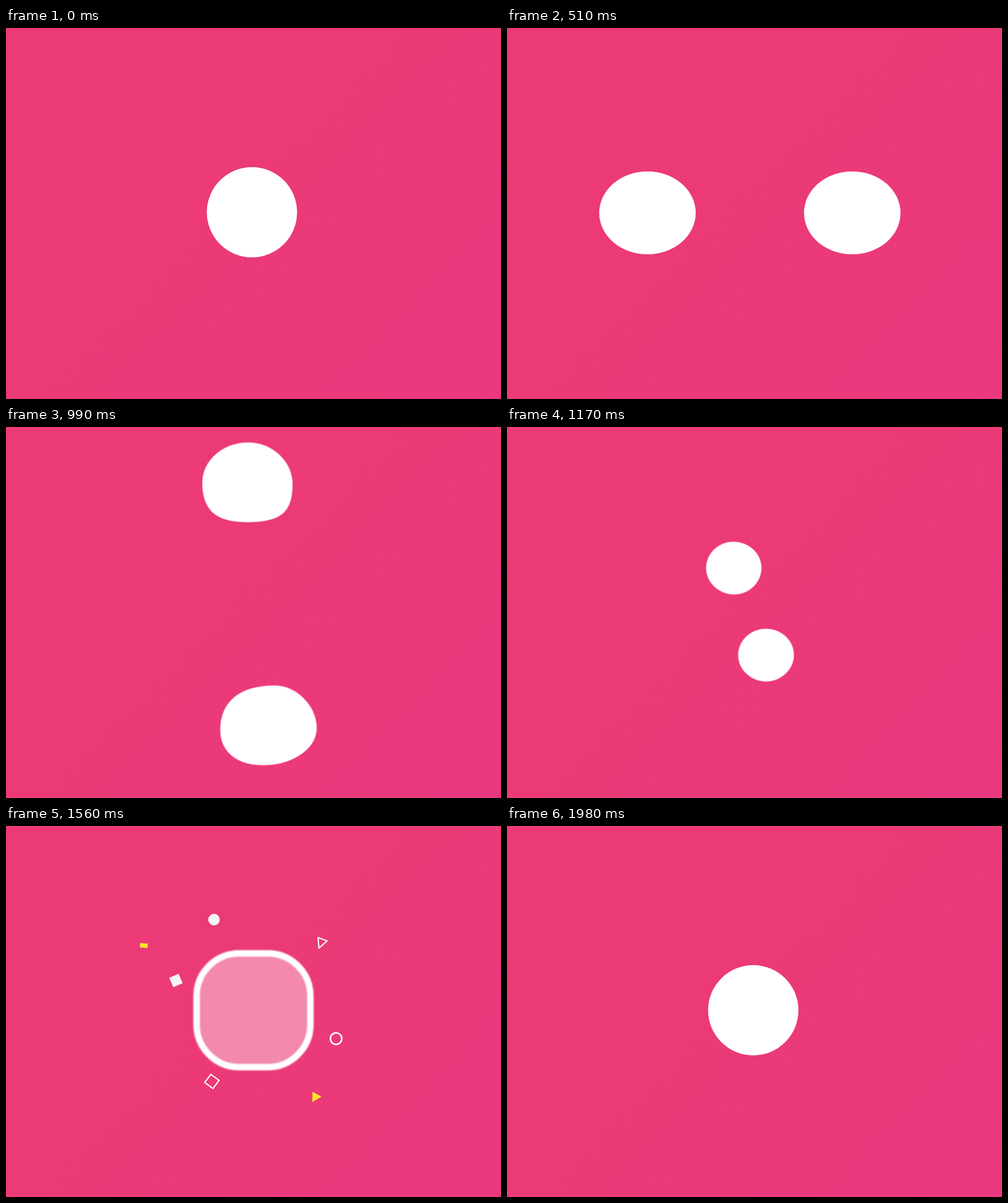
An HTML page that plays this animation: 800 px wide and 600 px high, repeating every 2.13 s.

```html
<!DOCTYPE html>
<html lang="en">
<head>
<meta charset="utf-8">
<title>Bouncing dot loop</title>
<style>
  html, body { margin: 0; width: 100%; height: 100%; overflow: hidden; background: #eb3a77; }
  svg {
    display: block; width: 100vw; height: 100vh;
    background: linear-gradient(135deg, #eb3a75 0%, #eb3a77 45%, #ea387f 100%);
  }
</style>
</head>
<body>
<svg id="stage" viewBox="0 0 800 600"></svg>
<script>
const LOOP = 2130, STEP = 30;
const ROUND = 0.5523;
const stage = document.getElementById('stage');

const clamp = x => Math.min(1, Math.max(0, x));
const ramp = (t, from, to) => clamp((t - from) / (to - from));
const n = x => +x.toFixed(2);

// Smooth curve through rows of [time, ...values], at rest at both ends.
function track(rows) {
  const last = rows.length - 1;
  const slope = (i, k) => i === 0 || i === last ? 0 :
    (rows[i + 1][k] - rows[i - 1][k]) / (rows[i + 1][0] - rows[i - 1][0]);
  return time => {
    const t = Math.min(rows[last][0], Math.max(rows[0][0], time));
    let i = 0;
    while (i < last - 1 && t >= rows[i + 1][0]) i++;
    const a = rows[i], b = rows[i + 1], d = b[0] - a[0];
    const u = (t - a[0]) / d, v = 1 - u;
    return a.slice(1).map((_, j) => {
      const k = j + 1;
      return v * v * (1 + 2 * u) * a[k] + u * u * (3 - 2 * u) * b[k]
        + d * u * v * (v * slope(i, k) - u * slope(i + 1, k));
    });
  };
}

// time, centre x, centre y, half distance, rx, ry
const split = track([
  [150, 397.5, 298, 0, 72.8, 72.8],
  [300, 395.5, 298, 42, 76, 70],
  [400, 393.5, 298.5, 100, 79, 66],
  [510, 392.5, 299, 165.5, 78, 67],
  [600, 392.5, 299, 206, 73, 75.5],
  [660, 392, 298, 199, 72.5, 72.5]
]);

// time, angle, distance, width, height,
// offsets of the left, top, right and bottom extremes, roundness of each corner
const plain = (t, angle, distance, w, h) =>
  [t, angle, distance, w, h, 0, 0, 0, 0, ROUND, ROUND, ROUND, ROUND];
const leader = track([
  plain(660, 180, 199, 145, 145),
  [780, 183.5, 211.4, 119, 161.5, 1, 12, -13, 14, .55, .72, .72, .55],
  [990, 269.5, 208.5, 145, 128, .5, 1, 3.5, 0, .55, .55, .74, .7],
  plain(1110, 380, 150, 126, 116),
  plain(1230, 480, 0, 44, 44),
  plain(1290, 510, 0, 0, 0)
]);
const follower = track([
  plain(660, 0, 199, 145, 145),
  [780, 1.9, 192.6, 136, 150, -4, -3, -1, -3, .55, .55, .55, .55],
  [990, 80.1, 187.3, 155, 128, 7.5, 10, 4.5, -8, .64, .52, .55, .62],
  plain(1110, 190, 150, 126, 116),
  plain(1230, 300, 0, 44, 44),
  plain(1290, 330, 0, 0, 0)
]);

// time, half size, corner (1 is a circle), turn, line, blur, fill, centre x
const badge = track([
  [1260, 0, 1, 0, 4, 6, 0, 400.5],
  [1380, 101, 1, 0, 2, 20, 0, 400.5],
  [1470, 126, 1, 0, 4, 7, 0, 400.5],
  [1560, 92, .75, 0, 7, 6, .4, 400],
  [1620, 74, .5, 7, 9, 5, .8, 399.5],
  [1680, 73, .48, 24, 9, 5, .965, 399],
  [1800, 73, .7, 66, 3, 2, 1, 398.5],
  [1980, 73, 1, 90, 0, 0, 1, 398]
]);

const line = 'fill="none" stroke="#fff" stroke-width="2"';
const box = (w, h, style) => `<rect x="${-w / 2}" y="${-h / 2}" width="${w}" height="${h}" ${style}/>`;
const confetti = [
  { x: 319, y: 112, turn: 0, art: '<circle r="9.3" fill="#f5f5f5"/>' },
  { x: 175, y: 165, turn: 30, fade: [1680, 1780], art: box(12.5, 7, 'fill="#fbe726"') },
  { x: 241, y: 237, turn: 2, art: box(16.5, 16.5, 'fill="#f5f5f5"') },
  { x: 539, y: 157, turn: 0, art: `<path d="M-2-8L9 3L-8 8Z" ${line} stroke-linejoin="round"/>` },
  { x: 569.3, y: 356.2, turn: 0, art: `<circle r="9.3" ${line} style="stroke-width:2.6"/>` },
  { x: 314.7, y: 444, turn: -28, art: box(16.5, 16.5, line) },
  { x: 526, y: 474, turn: 0, art: '<path d="M-.5-8L9 5.5L-8 7Z" fill="#fbe726"/>' }
];

const ellipse = (x, y, rx, ry) =>
  `<ellipse cx="${n(x)}" cy="${n(y)}" rx="${n(rx)}" ry="${n(ry)}" fill="#fff"/>`;

function drawSplit(t) {
  const [x, y, gap, rx, ry] = split(t);
  let art = ellipse(x - gap, y, rx, ry) + ellipse(x + gap, y, rx, ry);
  const thin = (gap - 51) / 54;
  if (thin > 0 && thin < 1) {
    const h = .7 * ry, c = 2 * h * (1 - thin) - h, reach = gap - .7 * rx;
    art += `<path fill="#fff" d="M${n(x - reach)} ${n(y - h)}Q${n(x)} ${n(y - c)} ${n(x + reach)} ${n(y - h)}`
      + `V${n(y + h)}Q${n(x)} ${n(y + c)} ${n(x - reach)} ${n(y + h)}Z"/>`;
  }
  return art;
}

function drawBlob([angle, distance, w, h, ly, tx, ry, bx, ...corners]) {
  if (w < 1 || h < 1) return '';
  const a = angle * Math.PI / 180;
  const x = 392 + distance * Math.cos(a) + (1 - clamp(distance / 150)) * 8;
  const y = 298 + distance * Math.sin(a);
  const ends = [[-w / 2, ly], [tx, -h / 2], [w / 2, ry], [bx, h / 2]];
  let d = `M${n(ends[0][0])} ${n(ends[0][1])}`;
  corners.forEach((k, i) => {
    const p = ends[i], q = ends[(i + 1) % 4];
    const dx = (q[0] - p[0]) * k, dy = (q[1] - p[1]) * k;
    const upright = i % 2 === 0;
    const c1 = upright ? [p[0], p[1] + dy] : [p[0] + dx, p[1]];
    const c2 = upright ? [q[0] - dx, q[1]] : [q[0], q[1] - dy];
    d += 'C' + [...c1, ...c2, ...q].map(n).join(' ');
  });
  return `<path transform="translate(${n(x)} ${n(y)})" d="${d}Z" fill="#fff"
    stroke="#fff" stroke-opacity=".45" stroke-width="2"/>`;
}

function drawBadge(t) {
  const [half, corner, turn, width, blur, fill, x] = badge(t);
  if (half < 1) return '';
  const shape = style => {
    const r = n(half), round = n(half * Math.min(1, corner));
    return `<rect x="${-r}" y="${-r}" width="${2 * r}" height="${2 * r}" rx="${round}" ${style}/>`;
  };
  let art = shape(`fill="#fff" fill-opacity="${n(clamp(fill))}"`);
  if (width > .05) {
    [.25, .2, .25, .44, .6, 1].forEach((alpha, i) => {
      const size = n(Math.max(0, width + blur * (1 - i / 5)));
      art += shape(`fill="none" stroke="#fff" stroke-width="${size}" stroke-opacity="${alpha}"`);
    });
  }
  return `<g transform="translate(${n(x)} 298) rotate(${n(turn)})">${art}</g>`;
}

function drawConfetti(t) {
  const flight = 1 - (1 - ramp(t, 1380, 1880)) ** 3;
  const travel = flight / .936;
  return confetti.map(({ x, y, turn, art, fade = [1860, 1980] }) => {
    const scale = ramp(t, 1380, 1500) * (1 - ramp(t, ...fade));
    if (scale <= 0) return '';
    const px = 400 + (x - 400) * travel, py = 298 + (y - 298) * travel;
    const spin = turn + (travel - 1) * 120;
    return `<g transform="translate(${n(px)} ${n(py)}) rotate(${n(spin)}) scale(${n(scale)})">${art}</g>`;
  }).join('');
}

function draw(t) {
  if (t <= 660) return drawSplit(t);
  let art = '';
  if (t < 1290) art += drawBlob(leader(t)) + drawBlob(follower(t));
  if (t >= 1260) art += drawConfetti(t) + drawBadge(t);
  return art;
}

const start = performance.now();
function tick() {
  const t = (performance.now() - start) % LOOP;
  stage.innerHTML = draw(Math.floor(t / STEP) * STEP);
  requestAnimationFrame(tick);
}
tick();
</script>
</body>
</html>
```
